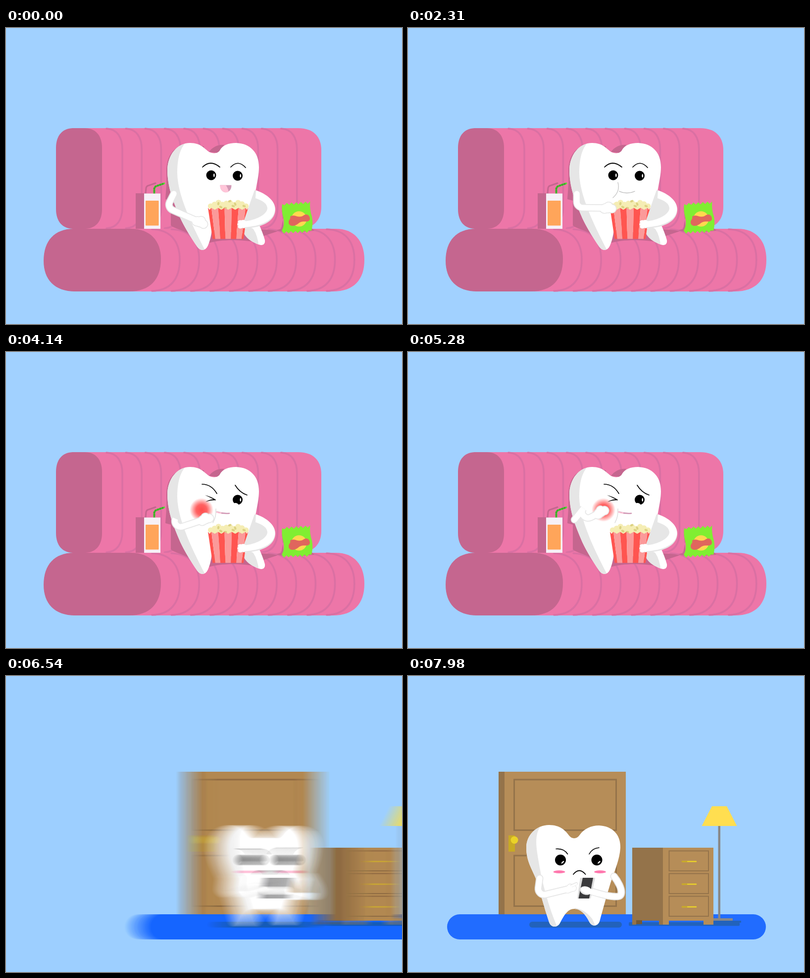
An HTML page with a canvas for the animation above (8 s loop, 800x600 px).

```html
<!DOCTYPE html>
<html lang="en">
<head>
<meta charset="utf-8">
<title>Toothache</title>
<style>
html, body { margin: 0; width: 100%; height: 100%; overflow: hidden; background: #a1d1ff; }
canvas { display: block; }
</style>
</head>
<body>
<canvas id="stage" width="800" height="600"></canvas>
<script>
const LOOP = 8000, PAN = 960, PAN_START = 6274, PAN_TIME = 420, SHUTTER = 15;
const SKY = '#a1d1ff', PINK = '#ed76a8', PLUM = '#c5668f', SEAM = '#da70a3', SHADE = '#e6e6e6';
const WOOD = '#b68d58', DARK_WOOD = '#94734a', GOLD = '#ead228', OLD_GOLD = '#c8aa25';

const stage = document.getElementById('stage').getContext('2d');
const room = document.createElement('canvas');
room.width = 800 + PAN;
room.height = 600;
const ctx = room.getContext('2d');

const clamp = v => Math.min(1, Math.max(0, v));
const ramp = (t, a, b) => { const k = clamp((t - a) / (b - a)); return k * k * (3 - 2 * k); };
const lerp = (a, b, k) => a + (b - a) * k;
const mix = (a, b, k) => a.map((v, i) => lerp(v, b[i], k));

function fill(color, d) {
  ctx.fillStyle = color;
  ctx.fill(new Path2D(d));
}
function line(color, width, d) {
  ctx.strokeStyle = color;
  ctx.lineWidth = width;
  ctx.stroke(new Path2D(d));
}
function rect(color, x, y, w, h, r = 0) {
  ctx.fillStyle = color;
  ctx.beginPath();
  ctx.roundRect(x, y, w, h, r);
  ctx.fill();
}
function oval(color, x, y, rx, ry = rx, angle = 0) {
  ctx.fillStyle = color;
  ctx.beginPath();
  ctx.ellipse(x, y, rx, ry, angle, 0, 7);
  ctx.fill();
}
function clipped(d, draw) {
  ctx.save();
  ctx.clip(new Path2D(d));
  draw();
  ctx.restore();
}
function eye(x, y, r, angle) {
  oval('#000', x, y, r);
  oval('#fff', x + Math.cos(angle) * r * .58, y + Math.sin(angle) * r * .58, 1.3, 3.6, angle);
}

// Arm with a rounded elbow and a fist that points along the forearm.
function arm([sx, sy, ex, ey, hx, hy], size = 1) {
  const angle = Math.atan2(hy - ey, hx - ex);
  const blobs = [[0, 0, 14, 9], [9, 1, 8, 8], [2, -6, 7, 5.5], [-6, 4, 8, 6]];
  const limb = (color, width) => {
    ctx.strokeStyle = color;
    ctx.lineWidth = width;
    ctx.beginPath();
    ctx.moveTo(sx, sy);
    ctx.arcTo(ex, ey, hx, hy, 12);
    ctx.lineTo(hx, hy);
    ctx.stroke();
  };
  const fist = (color, grow) => {
    ctx.save();
    ctx.translate(hx, hy);
    ctx.rotate(angle);
    ctx.scale(size, size);
    for (const [x, y, rx, ry] of blobs) oval(color, x, y, rx + grow, ry + grow);
    ctx.restore();
  };
  limb(SHADE, 15);
  fist(SHADE, 1.6);
  limb('#fff', 11.5);
  fist('#fff', 0);
}

function seams(d) {
  ctx.save();
  for (let i = 0; i < 10; i++) {
    line(SEAM, 3.6, d);
    ctx.translate(39.2, 0);
  }
  ctx.restore();
}

function drawSofa() {
  fill(PINK, 'M133 203H590C620 203 637 219 637 248V362C637 391 620 407 590 407H133Z');
  seams('M203 204C225 205 235 222 235 246V364C235 388 225 405 203 406');
  fill(PLUM, 'M136 203H159C181 203 194 218 194 243V367C194 392 181 407 159 407H136C114 407 101 392 101 367V243C101 218 114 203 136 203Z');
  fill(PINK, 'M135 407H666C703 407 724 431 724 470C724 510 703 534 660 534H135Z');
  seams('M295 408C332 409 351 432 351 470C351 509 332 532 295 533');
  fill(PLUM, 'M137 407H252C291 407 313 431 313 468C313 510 291 534 248 534H140C98 534 76 510 76 472C76 431 98 407 137 407Z');
}

function drawSnacks() {
  rect(PLUM, 262, 335, 18, 72);
  line(PLUM, 3, 'M282 335L283 324Q284 320 289 319L302 314.5');
  line('#5fe03a', 3.8, 'M299.5 336V326Q300 321.500 305 320L319.500 315');
  ctx.setLineDash([1, 4]);
  line('#3fa62a', 3.8, 'M299.5 336V326Q300 321.500 305 320L319.500 315');
  ctx.setLineDash([]);
  rect('#f7f0f7', 279, 335.5, 33, 71.5);
  rect('#ffa55a', 282, 350, 26.500, 50.500, 1);

  fill(PLUM, 'M556 358L560 385L556 407L546 410L562 414ZM614 402L623 411L600 413Z');
  let bag = 'M558 357';
  for (let i = 1; i < 13; i++) bag += `L${558 + i * 4.7} ${357 - i * .3 + (i % 2 ? 2.500 : -2)}`;
  bag += 'Q613 368 618 382Q621 397 617 411';
  for (let i = 1; i < 13; i++) bag += `L${617 - i * 4.6} ${411 + i * .2 + (i % 2 ? -1 : 3.500)}`;
  fill('#80ee32', bag + 'L557 411Q564 398 560 384Q556 369 558 357Z');
  oval('#ffd84f', 592, 387, 15.500);
  fill('#e0665d', 'M574 382C584 376 590 387 601 380C608 375 614 380 614 387C612 397 600 388 591 396C582 404 571 402 571 394C571 388 576 387 574 382Z');
}

const SITTER = 'M372 233C394 233 401 245 410 251C418 255 428 255 432 248C437 238 449 233 465 233C493 234 511 252 511 282C511 310 499 335 503 368C505 391 517 407 523 430C524 438 519 442 511 439C500 435 488 429 481 417L416 409C414 425 411 434 408 441C403 452 393 453 386 443C373 424 361 404 352 385C342 360 327 330 326 290C326 257 346 233 372 233Z';

function drawSitter() {
  fill(PLUM, 'M372 235C340 236 324 258 324 290C325 315 323 332 322 347L333 350V400C338 406 355 408 372 419L400 430V240Z');
  fill(PLUM, 'M410 251C418 241 428 236 441 237L432 254ZM405 437C435 428 470 429 498 433L516 423L549 412C535 408 520 409 500 407L405 400Z');
  fill('#fff', SITTER);
  clipped(SITTER, () => {
    fill(SHADE, 'M365 230C350 245 346 268 346 295C347 340 376 400 403 452H300V230Z');
    fill(SHADE, 'M478 412Q490 399 500 408Q508 420 511 443L478 430Z');
  });
}

function drawMouth(t, hurt) {
  const chewing = t > 1760;
  if (hurt > .5) {
    line('#d299b5', 2.4, 'M425 324Q438 328 451 327');
    line('#ffc5d8', 2.4, 'M425 324Q430 327 434 326');
    line('#ddd', 1.5, 'M424 318Q425 334 418 346');
  } else if (chewing) {
    const chew = Math.sin((t - 2310) / 75) * 1.5;
    line('#bdbdbd', 1.4, `M427 ${331 + chew}Q442 ${338 + chew} 458 ${331 + chew}`);
    line('#c8c8c8', 1.4, `M424 313Q${429 + chew} 331 414 344`);
  } else {
    const open = ramp(t, 600, 900);
    const [w, y, up, down] = mix([11.500, 318.500, 0, 19.500], [9, 321.500, 14, 14.500], open);
    const lips = `M${444 - w} ${y}C${444 - w} ${y - up} ${444 + w} ${y - up} ${444 + w} ${y}C${444 + w} ${y + down} ${444 - w} ${y + down} ${444 - w} ${y}Z`;
    fill('#d299b5', lips);
    clipped(lips, () => fill('#ffc5d8', 'M430 305L439 312Q450 324 450 335H430Z'));
  }
}

function drawSitterFace(t) {
  const hurt = ramp(t, 3880, 4110);
  const down = ramp(t, 500, 850) * (1 - ramp(t, 1650, 1900));
  const gaze = lerp(0, 1.35, down);
  if (hurt > 0) {
    const glow = ctx.createRadialGradient(395, 320, 2, 395, 320, 24);
    glow.addColorStop(0, '#ff5050');
    glow.addColorStop(.4, '#ff6262');
    glow.addColorStop(1, '#ff505000');
    ctx.globalAlpha = hurt;
    oval(glow, 395, 320, 24);
    ctx.globalAlpha = 1;
  }
  const brow = (calm, pained) => {
    const [a, b, c, d, e, f] = mix(calm, pained, hurt);
    line('#000', 1.7, `M${a} ${b}Q${c} ${d} ${e} ${f}`);
  };
  brow([397, 282, 413, 266, 432, 282], [396, 268, 415, 268, 426, 287]);
  brow([454, 282, 469, 266, 484, 283], [463, 270, 472, 285, 487, 290]);
  if (hurt > .5) fill('#000', 'M402 290Q414 293 424 299.500V300.500Q412 300 403 304Q410 299 419 298.500Q411 294 402 290Z');
  else eye(414.500, 298.500 + down * 8.500, 10, gaze);
  eye(468, 299.500 + down * 8.500, 10, gaze);
  if (hurt > .5) oval('#fff', 464, 310, 6, 4, .2);
  drawMouth(t, hurt);
}

function drawPopcorn() {
  const edges = [408, 415, 428.500, 441.500, 456, 470, 484, 489];
  const base = x => 449 + (x - 449) * .77;
  rect('#f5edb4', 412, 357, 74, 14);
  for (let i = 0; i < 10; i++) {
    const side = i === 0 || i === 9;
    oval('#f5edb4', 413.500 + i * 7.900, side ? 361 : 356 + Math.sin(i * 2.400) * 2.200, 5.600);
  }
  for (const [x, y] of [[429, 356], [434, 363], [443, 365], [463, 357], [459, 361], [481, 361], [452, 351]])
    oval('#dcd283', x, y, 3.400, 2.200, x);
  for (let i = 0; i < 7; i++) {
    const a = edges[i], b = edges[i + 1];
    fill(i % 2 ? '#fb9a9a' : '#ff5550', `M${a} 364.500L${(a + b) / 2} 368.500L${b} 364.500L${base(b)} 427.500H${base(a)}Z`);
  }
}

function drawHoldingArm() {
  fill(SHADE, 'M502 329C526 336 545 351 544 369C543 394 513 406 478 406L478 398Z');
  fill('#fff', 'M505 329C528 337 544 351 543.500 368C542 390 516 402 480 404V392C505 390 527 378 528 366C528 356 519 350 504 345Z');
  for (let i = 0; i < 3; i++) oval('#fff', 473 + (i === 1 ? -.500 : .500), 393 + i * 5, 5, 3.400);
  oval('#fff', 479, 397, 7, 8);
}

// Poses list shoulder, elbow and hand.
const REST = [339, 336, 325, 364, 391, 393], DIG = [346, 336, 349, 358, 417, 348], DEEP = [345, 336, 347, 360, 424, 356];
const EAT = [346, 336, 346, 357, 426, 332], HOLD = [341, 336, 341, 364, 403, 365];
const CHEEK = [342, 338, 332, 362, 402, 339], RUB = [336, 340, 318, 362, 388, 324];

function sitterArm(t) {
  const keys = [[0, REST], [100, REST], [800, DEEP], [1050, DEEP], [1260, DIG], [1600, EAT], [1760, EAT], [2250, HOLD], [3700, HOLD], [4110, CHEEK]];
  if (t >= 4140) return mix(CHEEK, RUB, .5 - .5 * Math.cos((t - 4140) * Math.PI / 400));
  let i = keys.length - 1;
  while (i > 0 && keys[i][0] > t) i--;
  const [from, pose] = keys[i], [to, next] = keys[i + 1] || [from + 1, pose];
  return mix(pose, next, ramp(t, from, to));
}

function drawSofaScene(t) {
  drawSofa();
  drawSnacks();
  drawSitter();
  drawSitterFace(t);
  drawPopcorn();
  drawHoldingArm();
  arm(sitterArm(t));
}

function drawFurniture() {
  rect('#216cff', 79, 483, 644, 51, 25.500);
  rect(WOOD, 183, 194, 257, 289);
  rect(DARK_WOOD, 183, 194, 12, 289);
  line(DARK_WOOD, 3, 'M214.500 210H420.500V312.500H214.500ZM214.500 364H420.500V466.500H214.500Z');
  rect(OLD_GOLD, 203, 323, 13, 33);
  oval(GOLD, 215, 332.500, 7.500);
  rect('#2262bb', 446, 499, 224, 7.500, 2);
  rect('#2262bb', 600, 496, 73, 4);
  rect('#888', 626.500, 303, 4.500, 190);
  rect('#888', 616, 491, 40, 5, 1);
  fill('#ffde50', 'M614 264H644L664.500 304H593.500Z');
  rect(DARK_WOOD, 453, 348, 62, 148);
  rect(DARK_WOOD, 453, 495, 8, 9);
  rect('#735937', 461, 495, 12, 8);
  rect(DARK_WOOD, 507, 495, 9, 9);
  rect(WOOD, 515, 348, 102, 148);
  rect(WOOD, 515, 495, 12, 9);
  rect(WOOD, 597, 495, 20, 9);
  for (let y = 354.500; y < 450; y += 46) {
    line(DARK_WOOD, 2, `M527.500 ${y}H607V${y + 40.500}H527.500Z`);
    line(GOLD, 2.500, `M554 ${y + 21.500}H582`);
    line(OLD_GOLD, 2.500, `M554 ${y + 21.500}H563`);
  }
}

const CALLER = 'M285 302C307 302 318 313 325 323C331 331 341 331 347 322C355 310 370 303 386 303C413 304 430 322 429 348C428 372 416 398 409 420C400 450 393 475 388 494C385 509 371 509 366 498C358 482 348 472 336 472C323 472 316 484 308 499C303 511 289 511 285 499C275 470 268 440 258 410C250 390 239 375 239 348C239 322 260 302 285 302Z';

function drawCaller(t) {
  rect('#2262bb', 245, 498, 187, 12, 6);
  fill('#fff', CALLER);
  clipped(CALLER, () => {
    fill(SHADE, 'M272 300C259 312 257 332 261 358C267 400 280 460 303 512H230V300Z');
    fill(SHADE, 'M336 470Q356 472 372 492Q376 500 380 510H360Z');
  });
  eye(308, 373, 11, .8);
  eye(381.500, 373, 11, .8);
  line('#000', 1.6, 'M299 350.500Q315 349 322.500 361M366 361Q372 349 386 348');
  line('#000', 1.8, 'M334 402Q346 387 358.500 402');
  oval('#ff78ae', 305.500, 397, 12, 3);
  oval('#ff78ae', 388, 397, 12, 3);

  const sleeve = 'M416 406C425 417 431 430 431 438C431 449 421 447.500 411 446.500C395 445 380 439 362 434';
  line(SHADE, 15, sleeve);
  line('#fff', 11.500, sleeve);
  fill('#dcdcdc', 'M348 409H378L369 451H342Z');
  fill('#3a3a3c', 'M353 409H374L366 451H344.500Z');
  oval(SHADE, 359, 435, 12, 8.500, .25);
  oval('#fff', 360, 434, 11, 7, .25);
  line('#fff', 11, 'M362 435L384 441');

  const tap = 1.6 * Math.sin((7980 - t) * Math.PI / 150);
  arm([266, 410, 261, 447, 327, 431 + tap], .75);
  line(SHADE, 6, `M331 ${425 + tap}L340 ${421 + tap}`);
  line('#fff', 4, `M330 ${426 + tap}L340 ${421.500 + tap}`);
}

function panX(t) {
  const u = clamp((t - PAN_START) / PAN_TIME);
  return -PAN * (u < .5 ? 4 * u ** 3 : 1 - 4 * (1 - u) ** 3);
}

function frame(now) {
  const t = now % LOOP;
  ctx.fillStyle = SKY;
  ctx.fillRect(0, 0, room.width, 600);
  ctx.lineCap = 'round';
  ctx.lineJoin = 'miter';
  if (t < PAN_START + PAN_TIME) drawSofaScene(t);
  ctx.save();
  ctx.translate(PAN, 0);
  drawFurniture();
  drawCaller(t);
  ctx.restore();

  // Average several pan positions within the shutter time for motion blur.
  const travel = Math.abs(panX(t + SHUTTER / 2) - panX(t - SHUTTER / 2));
  const samples = Math.min(24, Math.ceil(travel) + 1);
  for (let i = 0; i < samples; i++) {
    stage.globalAlpha = 1 / (i + 1);
    stage.drawImage(room, panX(t + SHUTTER * ((i + .5) / samples - .5)), 0);
  }
  requestAnimationFrame(() => frame(performance.now()));
}
frame(0);
</script>
</body>
</html>
```
